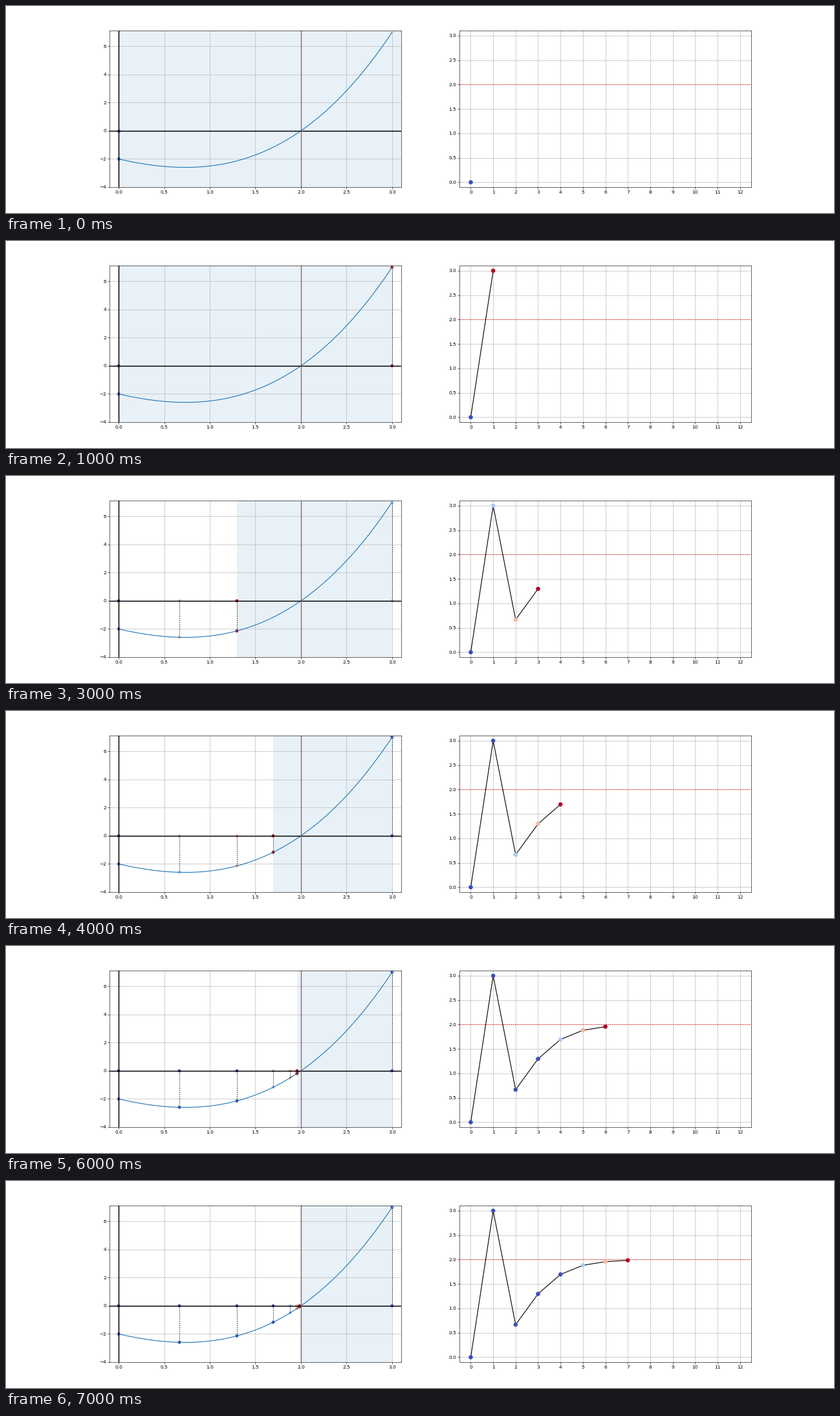
A matplotlib script that plays this animation: 1280x320 px, repeating every 8000 ms.

```python
import numpy as np
import matplotlib.pyplot as plt
from matplotlib.animation import FuncAnimation

STEPS = 8
ROOT = 2.0


def f(x):
    return 0.25 * x**3 + 0.75 * x**2 - 1.5 * x - 2


def regula_falsi(a, b, count):
    """Return the visited points and the bracket after each of them."""
    xs, brackets = [a, b], [(a, b + 0.2), (a, b)]
    while len(xs) < count:
        x = (a * f(b) - b * f(a)) / (f(b) - f(a))
        if f(x) < 0:
            a = x
        else:
            b = x
        xs.append(x)
        brackets.append((a, b))
    return np.array(xs), brackets


xs, brackets = regula_falsi(0.0, 3.0, STEPS)
curve = np.linspace(0, 3, 200)

plt.rcParams.update({"font.family": "DejaVu Sans", "font.size": 10})
fig, (left, right) = plt.subplots(1, 2, figsize=(24, 6), dpi=1280 / 24)
fig.subplots_adjust(left=0.125, right=0.9, bottom=0.125, top=0.88, wspace=0.2)


def setup(ax, xlim, ylim, xticks, yticks):
    ax.clear()
    ax.set(xlim=xlim, ylim=ylim, xticks=xticks, yticks=yticks)
    ax.grid(True)


def draw(n):
    pts = xs[: n + 1]
    idx = np.arange(n + 1)
    # only the latest four points span the colour range
    shade = dict(c=idx, cmap="coolwarm", vmin=max(0, n - 3), vmax=max(n, 1))

    setup(left, (-0.1, 3.1), (-4, 7.1), np.arange(0, 3.1, 0.5), range(-4, 7, 2))
    left.axvspan(*brackets[n], alpha=0.1)
    left.plot(curve, f(curve))
    left.axhline(0, color="black", lw=2)
    left.axvline(0, color="black", lw=2)
    left.axvline(ROOT, color="#7d5a5e", lw=1.6)
    left.vlines(pts, 0, f(pts), color="black", ls=":", lw=1.5, zorder=2)
    for ys in (np.zeros(n + 1), f(pts)):
        left.scatter(pts, ys, s=30, **shade)

    setup(right, (-0.5, 12.5), (-0.1, 3.1), range(13), np.arange(0, 3.1, 0.5))
    right.axhline(ROOT, color="red", ls=":", lw=1.5)
    right.plot(idx, pts, color="black")
    right.scatter(idx, pts, s=60, zorder=3, **shade)


anim = FuncAnimation(fig, draw, frames=STEPS, init_func=lambda: draw(0),
                     interval=1000, repeat=True, repeat_delay=0)
plt.show()
```
